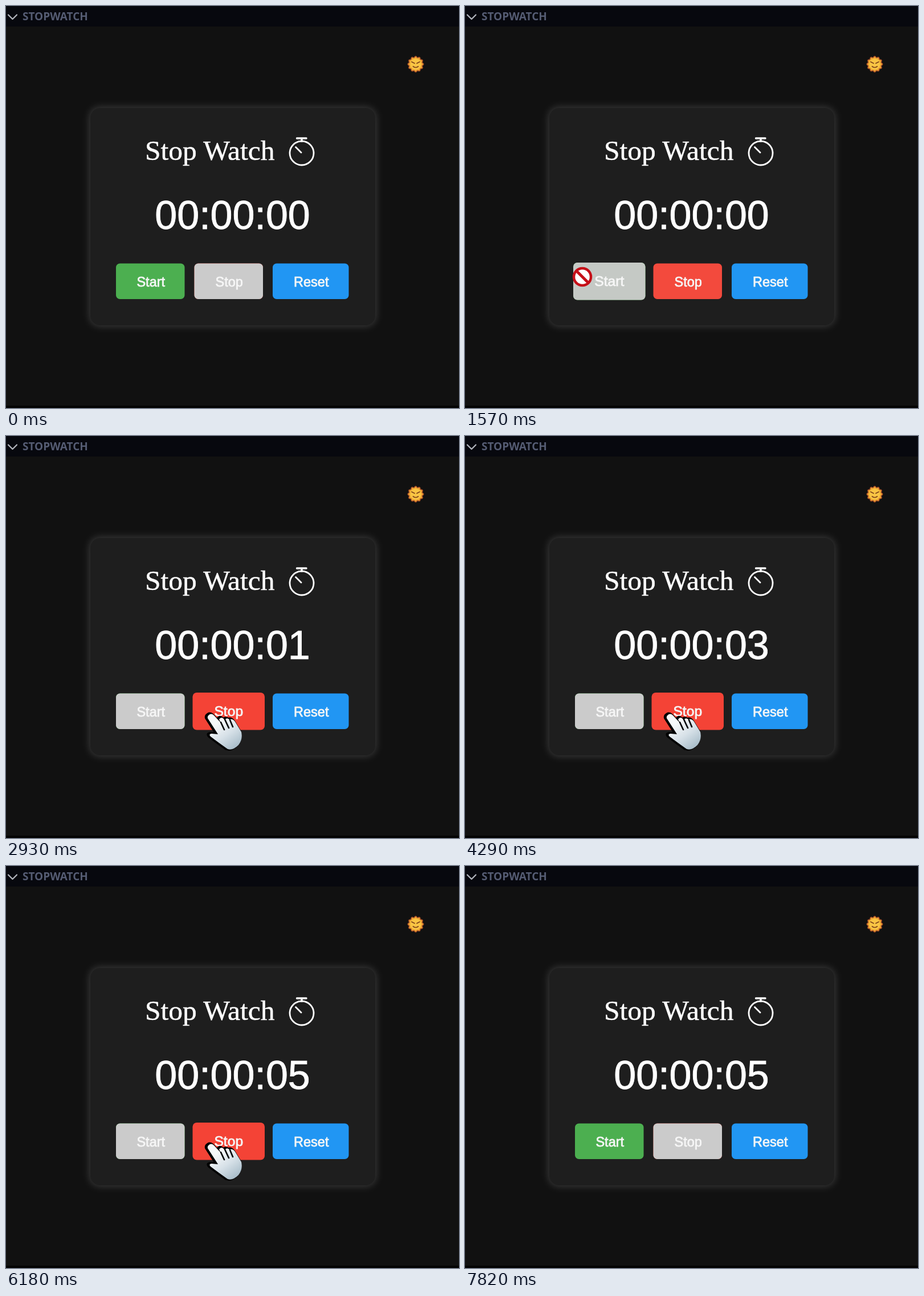
An HTML page for the animation above (7.9 s loop, 795 by 705 pixels).

```html
<!DOCTYPE html>
<html lang="en">
<head>
<meta charset="utf-8">
<title>Stopwatch</title>
<style>
  html, body { margin: 0; width: 100%; height: 100%; overflow: hidden; background: #111; }
  svg { display: block; width: 795px; height: 705px; }
  .header { font: 700 19px "Open Sans", sans-serif; fill: #555c73; }
  .title { font: 49.5px "Liberation Serif", serif; fill: #fff; stroke: #fff; stroke-width: .5; }
  .time { font: 70px "Liberation Sans", Arial, sans-serif; fill: #fff; stroke: #fff; stroke-width: .9; }
  .label { font: 23.5px "Liberation Sans", Arial, sans-serif; fill: #f6f6f6; stroke: #f6f6f6; stroke-width: .8; text-anchor: middle; }
  svg text { font-kerning: none; }
  .line { fill: none; stroke-linecap: round; stroke-linejoin: round; }
</style>
</head>
<body>
<svg viewBox="0 0 795 705">
  <defs>
    <filter id="glow" x="-20%" y="-20%" width="140%" height="140%"><feGaussianBlur stdDeviation="7"/></filter>
    <linearGradient id="skin" x1="0" y1="0" x2=".7" y2="1">
      <stop offset=".3" stop-color="#f7f9fa"/><stop offset=".65" stop-color="#d7e1e8"/><stop offset="1" stop-color="#abbfcb"/>
    </linearGradient>
    <path id="handShape" d="M207 479.5Q211 477 215 481L227 494L224 488Q227 483 231 486L234 489Q237 484 242 488Q248 486 252 492L263 510Q266 523 258 533Q248 543 239 540Q222 528 209 518Q205 514 211 513L222 514L204 486Q203 482 207 479.5Z"/>
  </defs>

  <rect width="795" height="705" fill="#111"/>
  <rect width="795" height="36" fill="#07080e"/>
  <rect y="701" width="795" height="4" fill="#040404"/>
  <path class="line" d="M4 15.5L11.5 23L19 15.5" stroke="#b4b7bf" stroke-width="2.2"/>
  <text class="header" x="29" y="25">STOPWATCH</text>

  <g transform="translate(719 102)">
    <path id="sun" fill="#f2ae35" stroke="#b4582a" stroke-width="1.6"/>
    <circle r="9.5" fill="#f9c544"/>
    <path class="line" d="M-7 -4L-2 -1.5M7 -4L2 -1.5M-4.5 4Q0 7.5 4.5 4" stroke="#7d421a" stroke-width="1.7"/>
  </g>

  <rect x="147" y="178" width="502" height="383" rx="18" fill="#fff" opacity=".19" filter="url(#glow)"/>
  <rect x="148" y="179" width="500" height="381" rx="17" fill="#1e1e1e"/>
  <text class="title" x="244" y="270">Stop Watch</text>
  <g class="line" stroke="#fff" stroke-width="2.8">
    <circle cx="519" cy="258" r="21"/>
    <path d="M510.5 232H527M519 232V237" stroke-width="3.4"/>
    <path d="M508.5 247.5L518 257"/>
  </g>
  <text class="time" id="time" x="261.3" y="391">00:00:00</text>

  <g id="buttons"></g>

  <g id="hand">
    <use href="#handShape" x="-2.5" y="-.5" stroke="#000" stroke-width="5" stroke-linejoin="round"/>
    <use href="#handShape" fill="url(#skin)"/>
    <path class="line" d="M227 493L233 506M234 488L241 503M243 489L248 501" stroke="#050708" stroke-width="2.6"/>
  </g>
  <g id="blocked">
    <circle cx="206" cy="475" r="15" fill="#fff" stroke="#c50f18" stroke-width="4.5"/>
    <path d="M195.5 464.5L216.5 485.5" stroke="#c50f18" stroke-width="5"/>
  </g>
</svg>
<script>
const LOOP = 7900, START_CLICK = 1180, STOP_CLICK = 6500;
const TICKS = [2090, 3090, 4090, 5090, 6180];
const SVG = "http://www.w3.org/2000/svg";
const $ = id => document.getElementById(id);

// Pointer offsets from its rest position over Start: time, x, y
const PATH = [[330, 12, 240], [740, 0, 0], [2130, 0, 0], [2480, 150, 9],
              [7060, 150, 9], [7430, 138, 240]];

const clamp = u => Math.max(0, Math.min(1, u));
const easeOut = u => 1 - (1 - clamp(u)) ** 2;
const smooth = u => u * u * (3 - 2 * u);
const pulse = (t, on, off, duration) =>
  easeOut((t - on) / duration) - easeOut((t - off) / duration);

function add(parent, tag, attributes, content = "") {
  const node = document.createElementNS(SVG, tag);
  for (const key in attributes) node.setAttribute(key, attributes[key]);
  node.textContent = content;
  parent.append(node);
  return node;
}

function makeButton(name, x, width, color) {
  const group = add($("buttons"), "g", {});
  const box = { x, y: 451.5, width, height: 62.5, rx: 7 };
  add(group, "rect", { ...box, fill: color });
  const gray = add(group, "rect", { ...box, fill: "#cbcbcb", opacity: 0 });
  const cx = x + width / 2;
  const label = add(group, "text", { class: "label", x: cx + 1, y: 492 }, name);
  return (hover, disabled) => {
    const scale = 1 + 0.05 * hover;
    group.setAttribute("transform",
      `translate(${cx} 482.5) scale(${scale}) translate(${-cx} -482.5)`);
    gray.setAttribute("opacity", disabled);
    label.setAttribute("transform", `translate(${-hover} ${-1.5 * hover})`);
  };
}

const setStart = makeButton("Start", 193, 120.5, "#4caf50");
const setStop = makeButton("Stop", 330.5, 120.5, "#f44336");
makeButton("Reset", 468, 133.5, "#2196f3");

const rim = Array.from({ length: 120 }, (_, i) => {
  const a = i * Math.PI / 60, r = 12.7 + Math.cos(12 * a);
  return `${(r * Math.cos(a)).toFixed(2)} ${(r * Math.sin(a)).toFixed(2)}`;
});
$("sun").setAttribute("d", `M${rim.join("L")}Z`);

function pointerAt(t) {
  const i = PATH.findIndex(p => p[0] > t);
  if (i < 1) return null;
  const [t0, x0, y0] = PATH[i - 1], [t1, x1, y1] = PATH[i];
  const u = smooth((t - t0) / (t1 - t0));
  return [x0 + (x1 - x0) * u, y0 + (y1 - y0) * u];
}

function draw(t) {
  $("time").textContent = "00:00:0" + TICKS.filter(tick => t >= tick).length;

  const running = pulse(t, START_CLICK, STOP_CLICK, 500);
  setStart(pulse(t, 640, 2290, 250), running);
  setStop(pulse(t, 2320, 7140, 250), 1 - running);

  const pointer = pointerAt(t);
  const blocked = (t >= START_CLICK && t < 2290) || (t >= STOP_CLICK && t < 7140);
  $("hand").style.display = pointer && !blocked ? "" : "none";
  $("blocked").style.display = pointer && blocked ? "" : "none";
  if (pointer) {
    for (const id of ["hand", "blocked"])
      $(id).setAttribute("transform", `translate(${pointer})`);
  }
}

function frame() {
  draw(performance.now() % LOOP);
  requestAnimationFrame(frame);
}
frame();
</script>
</body>
</html>
```
